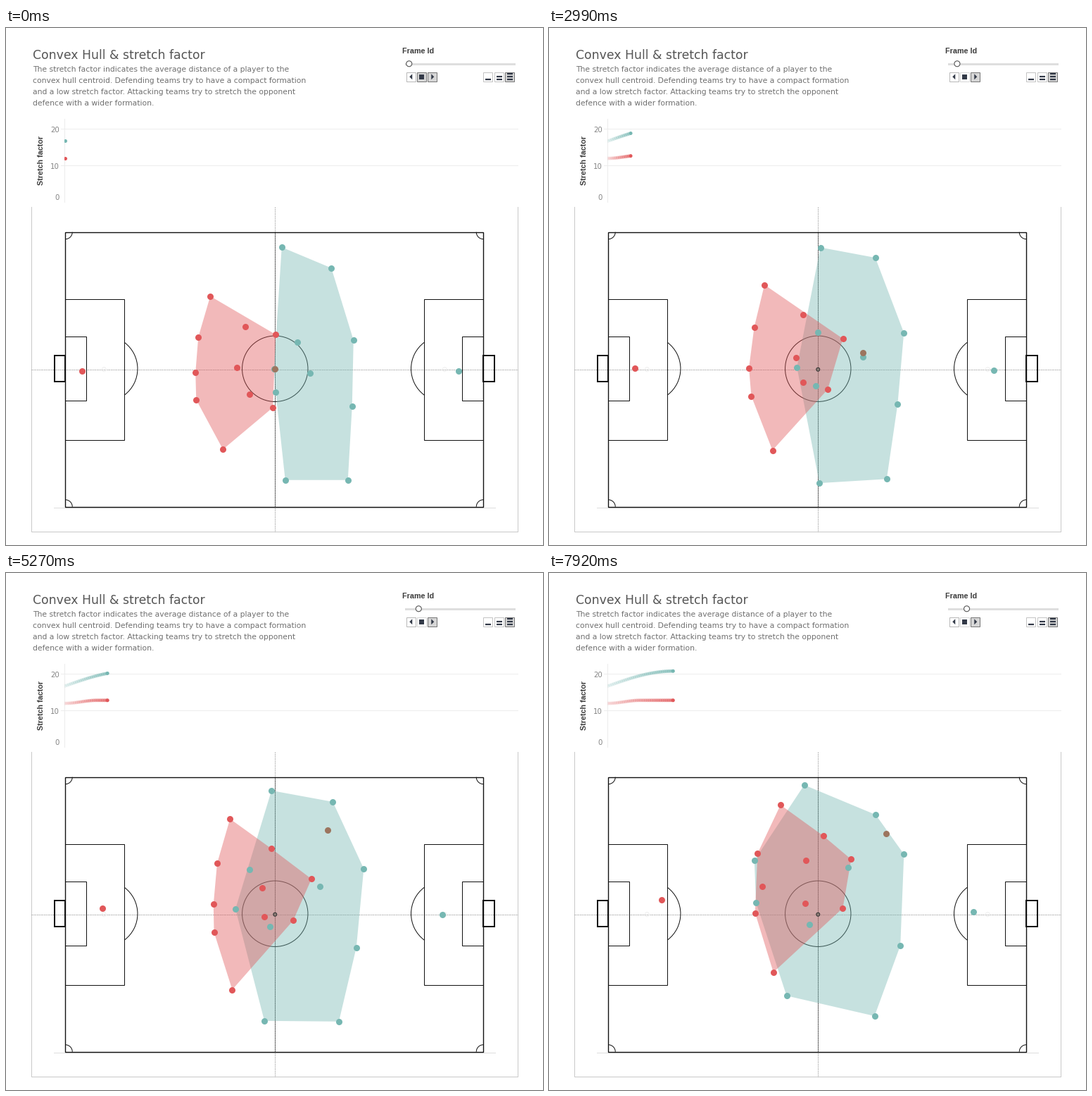
A matplotlib script that plays this animation: 763x734 px, repeating every 8 s.

```python
import numpy as np
import matplotlib.pyplot as plt
from matplotlib.animation import FuncAnimation
from matplotlib.colors import to_rgba
from matplotlib.patches import Arc, Circle, Polygon, Rectangle

W, H, DPI = 763, 734, 64
PT = 72 / DPI  # points per pixel
STEP, LOOP = 20, 8000
PLAY, FIRST, TICK = 380, 610, 108  # button press, first redraw, redraw period
START, END = 420, 7920
RED, TEAL, BROWN = "#e15759", "#76b7b2", "#9c755f"
INK, GREY, DARK = "#111111", "#707070", "#333a48"

# Each player: (x, y) at the start, on the way and at the end
KEYS = [START, 4610, END]
TEAL_TEAM = [
    [(391.5, 310.5), (380, 309.5), (362, 300)],
    [(462, 340), (464, 322), (464, 343)],
    [(493.5, 442.5), (508, 423.5), (504, 398)],
    [(491.5, 536), (497, 531.5), (499, 528)],
    [(485.5, 641), (475, 637.5), (462, 628)],
    [(396.5, 641), (373, 641), (336.5, 598.5)],
    [(380.5, 483.5), (333.5, 478), (293, 466.5)],
    [(414, 445), (358, 423), (290, 407)],
    [(383, 516.5), (376.5, 502), (369.5, 498.5)],
    [(432, 489), (448, 450.5), (424, 416.5)],
    [(642.5, 486), (624, 484.5), (602, 480)],
]
RED_TEAM = [
    [(290, 380), (315, 353), (329, 328)],
    [(273, 438), (299, 415), (296, 397)],
    [(269, 488), (292, 474.5), (303, 444)],
    [(270, 527), (294.5, 514.5), (292.5, 481)],
    [(308, 597.5), (321, 595), (318.5, 565.5)],
    [(340, 423.5), (373, 395), (390, 372)],
    [(327.5, 481.5), (361.5, 454), (365, 406)],
    [(345.5, 519), (366.5, 491.5), (364, 467.5)],
    [(383, 434.5), (432, 438), (429, 405)],
    [(379, 538), (405, 497.5), (417.5, 474.5)],
    [(108, 486), (132, 478), (160, 463)],
]
BALL_KEYS = [START, 2140, 4610, 6050, END]
BALL = [[(382, 483.5), (432.5, 485.5), (455, 388), (460, 343), (480, 370.5)]]


def smooth(u):
    u = np.clip(u, 0, 1)
    return u * u * (3 - 2 * u)


# Height of the chart curves at share s of the final length
CURVES = {
    TEAL: lambda s: 159.5 - 21 * np.sin(s * np.pi / 2),
    RED: lambda s: 184.3 - 4.3 * smooth(s / 0.48),
}


def make_path(keys, points):
    """Return a function of time running smoothly through the points."""
    keys, points = np.array(keys), np.array(points, float)
    slopes = np.gradient(points, keys, axis=1)

    def at(t):
        t = np.clip(t, keys[0], keys[-1])
        i = min(np.searchsorted(keys, t, side="right"), len(keys) - 1) - 1
        span = keys[i + 1] - keys[i]
        u = (t - keys[i]) / span
        a, b = points[:, i], points[:, i + 1]
        ma, mb = slopes[:, i] * span, slopes[:, i + 1] * span
        return (a + (b - a) * smooth(u) + ma * u * (1 - u) ** 2
                - mb * u ** 2 * (1 - u))

    return at


def convex_hull(points):
    pts = sorted(map(tuple, points))

    def chain(seq):
        out = []
        for p in seq:
            while len(out) > 1:
                (ax, ay), (bx, by) = out[-2:]
                if (bx - ax) * (p[1] - ay) - (by - ay) * (p[0] - ax) > 0:
                    break
                out.pop()
            out.append(p)
        return out[:-1]

    return chain(pts) + chain(pts[::-1])


fig = plt.figure(figsize=(W / DPI, H / DPI), dpi=DPI, facecolor="white")
ax = fig.add_axes([0, 0, 1, 1])
# The quarter-pixel shift makes whole coordinates snap to their own pixel
ax.set(xlim=(-0.25, W - 0.25), ylim=(H - 0.75, -0.75))
ax.axis("off")


def line(x, y, color=INK, lw=1.0, z=1, **kw):
    ax.plot(x, y, color=color, lw=lw * PT, zorder=z, **kw)


def box(x0, y0, x1, y1, edge=INK, lw=1.0, fill="none", z=1):
    return ax.add_patch(Rectangle((x0, y0), x1 - x0, y1 - y0, ec=edge, fc=fill,
                                  lw=lw * PT, zorder=z))


def disc(x, y, r, fill, edge, lw=1.0, z=4):
    return ax.add_patch(Circle((x, y), r, fc=fill, ec=edge, lw=lw * PT, zorder=z))


def arc(x, y, r, start, end):
    ax.add_patch(Arc((x, y), 2 * r, 2 * r, theta1=start, theta2=end,
                     ec=INK, lw=PT, zorder=1))


def label(x, y, text, size, color=GREY, family="DejaVu Sans", **kw):
    ax.text(x, y, text, fontsize=size * PT, color=color, family=family, **kw)


def bold(x, y, text, size, **kw):
    label(x, y, text, size, "#3c3c3c", "Liberation Sans", weight="bold", **kw)


def draw_header():
    label(37.5, 43.5, "Convex Hull & stretch factor", 17.3, "#555555")
    rows = ["The stretch factor indicates the average distance of a player to the",
            "convex hull centroid. Defending teams try to have a compact formation",
            "and a low stretch factor. Attacking teams try to stretch the opponent",
            "defence with a wider formation."]
    for i, row in enumerate(rows):
        label(37.5, 61.5 + 16 * i, row, 10.72)
    bold(563, 35, "Frame Id", 10.7)


def draw_controls():
    line([568, 722], [50, 50], "#dedede", 3)
    box(569, 62, 582, 75, "#b8b8b8")
    box(599, 62, 612, 75, "#777777", fill="#d6d6d6")
    for tip, base in ((573, 577), (608, 604)):
        ax.add_patch(Polygon([(tip, 68.5), (base, 64.5), (base, 72.5)],
                             fc=DARK, ec="none", zorder=3))
    box(587, 65, 594, 72, "none", fill=DARK, z=3)
    for i, x in enumerate((678, 694, 709)):
        pressed = i == 2
        box(x, 62, x + 13, 75, "#777777" if pressed else "#c4c4c4",
            fill="#d6d6d6" if pressed else "white")
        for k in range(i + 1):
            line([x + 2.5, x + 10.5], [72 - 4 * k] * 2, DARK, 2.2, z=3,
                 solid_capstyle="butt")


def draw_chart():
    for y in (142, 194):
        line([78, 727], [y, y], "#ededed")
    line([83, 83], [128, 246], "#ececec")
    for y, text in ((143, "20"), (195, "10"), (239, "0")):
        label(76, y, text, 10.3, "#858585", ha="right", va="center_baseline")
    bold(50, 187, "Stretch factor", 10.8, rotation=90, ha="center", va="center")


def draw_pitch():
    line([36, 36, 727, 727], [253, 714, 714, 253], "#c9c9c9")
    line([0, W], [733, 733], "#b8b8b8")
    line([68, 695], [680, 680], "#dddddd")
    dots = dict(dashes=(1.5, 1), dash_capstyle="butt")
    line([36, 727], [484, 484], "#a8a8a8", **dots)
    line([382, 382], [253, 714], "#a8a8a8", **dots)
    line([382, 382], [289, 679], "#444444", **dots)

    box(84, 289, 678, 679, lw=1.4)
    for goal_line, side in ((84, 1), (678, -1)):
        box(goal_line, 384, goal_line + 84 * side, 584)
        box(goal_line, 437, goal_line + 30 * side, 528)
        box(goal_line, 464, goal_line - 15.5 * side, 501, lw=2)
        turn = 0 if side > 0 else 180
        arc(goal_line + 56 * side, 483, 46.7, turn - 53, turn + 53)
        disc(goal_line + 55 * side, 484, 3, "none", "#eeeeee", z=1)
    arc(382, 483, 46.7, 0, 360)
    corners = ((84, 289), (678, 289), (678, 679), (84, 679))
    for i, (x, y) in enumerate(corners):
        arc(x, y, 10, 90 * i, 90 * i + 90)
    disc(382, 484, 2.5, "#8a7a74", "#333333")


draw_header()
draw_controls()
draw_chart()
draw_pitch()

paths = [make_path(KEYS, TEAL_TEAM), make_path(KEYS, RED_TEAM),
         make_path(BALL_KEYS, BALL)]
hulls = [ax.add_patch(Polygon([(0, 0)] * 3, fc=c, ec="none", alpha=0.415, zorder=z))
         for c, z in ((TEAL, 2), (RED, 3))]
marks = [ax.scatter([], [], s=(9 * PT) ** 2, color=c, lw=0, zorder=z)
         for c, z in ((TEAL, 5), (RED, 6), (BROWN, 7))]
knob = disc(572.5, 50, 4, "white", "#555555", 1.1)
stop = box(584, 62, 597, 75, z=2)
plot_area = Rectangle((82.5, 125), 645, 125, transform=ax.transData)
trails = {}
for color in CURVES:
    trails[color] = ax.scatter([], [], s=(5 * PT) ** 2, lw=0, zorder=3)
    trails[color].set_clip_path(plot_area)


def draw_trail(color, share):
    s = np.append(np.arange(0, share - 0.005, 1 / 35), share)
    rgba = np.tile(to_rgba(color), (len(s), 1))
    rgba[:, 3] = np.linspace(0.14, 0.62, len(s))
    rgba[-1, 3] = 1
    trails[color].set_offsets(np.column_stack([84 + 93 * s, CURVES[color](s)]))
    trails[color].set_facecolors(rgba)


def update(i):
    now = i * STEP + STEP / 2
    t = FIRST + (now - FIRST) // TICK * TICK if now >= FIRST else 0
    spots = [path(t) for path in paths]
    for mark, xy in zip(marks, spots):
        mark.set_offsets(xy)
    for hull, xy in zip(hulls, spots):
        hull.set_xy(convex_hull(xy[:-1]))  # the keeper comes last
    share = np.clip((t - START) / (END - START), 0, 1)
    for color in CURVES:
        draw_trail(color, share)
    knob.set_center((572.5 + 21 * share, 50))
    paused = now < PLAY
    stop.set_facecolor("#d6d6d6" if paused else "white")
    stop.set_edgecolor("#777777" if paused else "#d8d8d8")
    return [*marks, *hulls, knob, stop, *trails.values()]


anim = FuncAnimation(fig, update, frames=LOOP // STEP, interval=STEP,
                     repeat=True, repeat_delay=0, blit=False)
plt.show()
```
